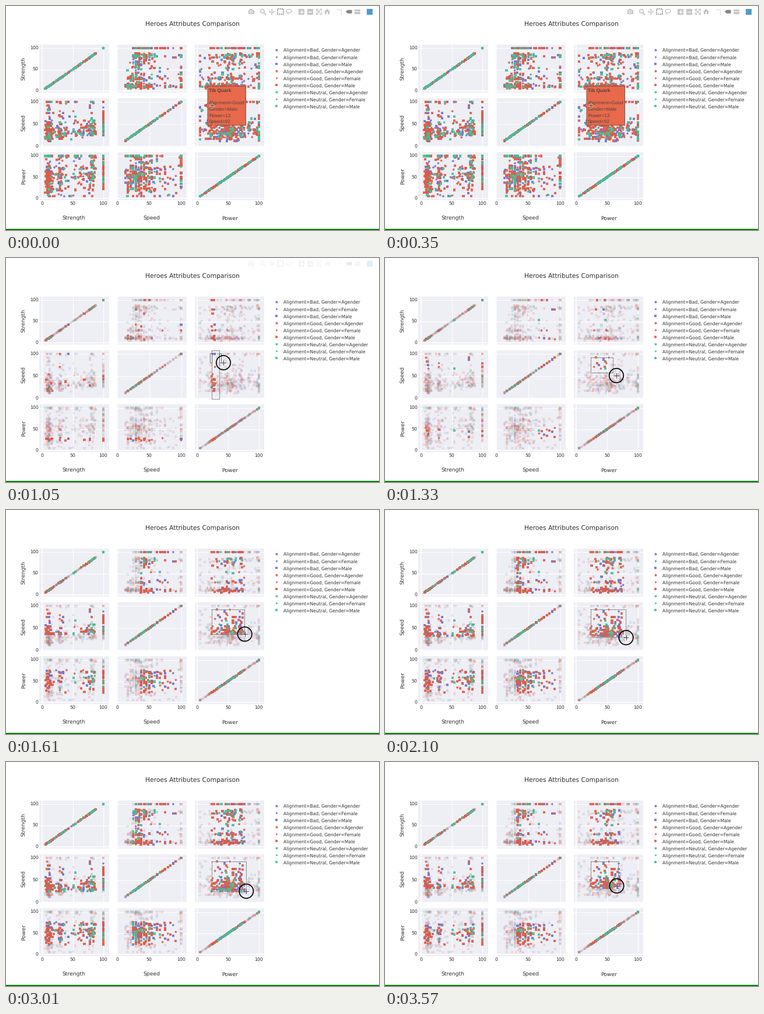
Write a matplotlib script that moves like this. It is 640 px wide and 383 px high and loops after 3640 ms.

```python
from itertools import product

import matplotlib.pyplot as plt
import numpy as np
from matplotlib.animation import FuncAnimation
from matplotlib.colors import to_rgb
from matplotlib.patches import Circle, Ellipse, Polygon, Rectangle

W, H, DPI = 640, 383, 64
PT = 72 / DPI  # points per pixel
FRAMES, INTERVAL = 52, 70
PRESS = 12  # mouse down
INK, PALE, DARK = "#303030", "#c6c6c6", "#858585"

plt.rcParams["font.family"] = "DejaVu Sans"
plt.rcParams["text.hinting"] = "no_hinting"
fig = plt.figure(figsize=(W / DPI, H / DPI), dpi=DPI, facecolor="white")
ax = fig.add_axes([0, 0, 1, 1])
ax.set_xlim(0, W)
ax.set_ylim(H, 0)
ax.axis("off")


def rect(x, y, w, h, color, z=1, edge="none", lw=0, **kw):
    return ax.add_patch(Rectangle((x, y), w, h, facecolor=color, edgecolor=edge,
                                  lw=lw * PT, zorder=z, **kw))


def line(xs, ys, color, lw=1, z=1, **kw):
    return ax.plot(xs, ys, color=color, lw=lw * PT, zorder=z, **kw)[0]


def poly(points, color, z=1, edge="none", lw=0):
    return ax.add_patch(Polygon(points, facecolor=color, edgecolor=edge,
                                lw=lw * PT, zorder=z))


def label(x, y, s, size, ha="center", **kw):
    kw = {"color": INK, **kw}
    return ax.text(x, y + 0.37 * size, s, fontsize=size * PT, ha=ha,
                   va="baseline", **kw)


# ---- panels
NAMES = ["Strength", "Speed", "Power"]
LEFT = 57 + 133.4 * np.arange(3)
TOP = 66 + 92 * np.arange(3)
PANEL_W, PANEL_H = 119.6, 82.4
X_ZERO, X_UNIT = [62, 191, 328], [1.05, 1.095, 1.06]
Y_ZERO, Y_UNIT = [145, 240, 329], [-0.73, -0.76, -0.725]


def to_x(v, col):
    return X_ZERO[col] + X_UNIT[col] * v


def to_y(v, row):
    return Y_ZERO[row] + Y_UNIT[row] * v


def draw_panels():
    for col, row in product(range(3), repeat=2):
        x, y = LEFT[col], TOP[row]
        rect(x, y, PANEL_W, PANEL_H, "#eeeef5")
        for v in (0, 50, 100):
            lw = 1 if v else 1.6
            line([to_x(v, col)] * 2, [y, y + PANEL_H], "white", lw, 2)
            line([x, x + PANEL_W], [to_y(v, row)] * 2, "white", lw, 2)
    for i, name in enumerate(NAMES):
        for v in (0, 50, 100):
            label(to_x(v, i), 338, v, 7.8)
            label(55.5, to_y(v, i), v, 7.8, "right")
        label(LEFT[i] + PANEL_W / 2, 362, name, 9.2)
        ax.text(30, TOP[i] + PANEL_H / 2, name, fontsize=9.2 * PT, rotation=90,
                ha="center", va="center", color=INK)
    label(319.5, 30, "Heroes Attributes Comparison", 10.8)
    rect(0, 381, W, 2, "#078207")


# ---- hero data
rng = np.random.default_rng(7)
HERO = (10, 92, 13)  # the hovered one
SPEED_STEP = 100 / 24


def make_strength(n):
    weak, fair, strong = (rng.normal(m, s, n) for m, s in ((11, 2.5), (29, 2), (82, 3)))
    pick = rng.choice(5, n, p=[0.36, 0.12, 0.25, 0.16, 0.11])
    values = np.choose(pick, [weak, fair, rng.uniform(16, 77, n), strong, 100])
    return np.clip(values, 4, 100).round()


def make_speed(strength):
    n = len(strength)
    raw = 9 + rng.gamma(2.2, 11, n) + 0.13 * strength
    raw = np.where(rng.random(n) < 0.06, 100, np.clip(raw, 8, 100))
    stepped = (raw / SPEED_STEP).round() * SPEED_STEP
    return np.where(rng.random(n) < 0.65, stepped, raw.round())


def make_power(strength):
    n = len(strength)
    power = np.clip(rng.normal(45, 23, n) + 0.16 * strength, 5, 97).round()
    return np.where(rng.random(n) < 0.1, 100, power)


# share of heroes, colour
ALIGNMENTS = {"Bad": (0.27, "#6f70cb"), "Good": (0.57, "#db5c47"),
              "Neutral": (0.16, "#42c09a")}
# share of heroes, marker, size
GENDERS = {"Agender": (0.04, "o", 4.6), "Female": (0.26, "D", 3.2),
           "Male": (0.70, "s", 4.1)}
HEROES = 350


class Trace:
    """One alignment and gender group, drawn in all nine panels."""

    def __init__(self, align, gender):
        share, color = ALIGNMENTS[align]
        part, self.marker, self.size = GENDERS[gender]
        self.name = f"Alignment={align}, Gender={gender}"
        self.color = to_rgb(color)
        strength = make_strength(round(HEROES * share * part))
        data = np.array([strength, make_speed(strength), make_power(strength)])
        if (align, gender) == ("Good", "Male"):
            data[:, 0] = HERO
        xs = [to_x(d, i) for i, d in enumerate(data)]
        ys = [to_y(d, i) for i, d in enumerate(data)]
        self.px, self.py = xs[2], ys[1]
        x, y = zip(*product(xs, ys))
        self.dots = self.scatter(np.concatenate(x), np.concatenate(y), self.size)

    def scatter(self, x, y, size):
        return ax.scatter(x, y, s=(size * PT) ** 2, marker=self.marker,
                          color=self.color, linewidths=0, zorder=3)

    def shade(self, box):
        alpha = np.full(len(self.px), 0.9)
        if box is not None:
            x, y, w, h = box
            inside = ((self.px >= x) & (self.px <= x + w)
                      & (self.py >= y) & (self.py <= y + h))
            alpha = np.where(inside, 0.9, 0.17)
        rgba = np.column_stack([np.tile(self.color, (len(alpha), 1)), alpha])
        self.dots.set_facecolor(np.tile(rgba, (9, 1)))


draw_panels()
traces = [Trace(a, g) for a, g in product(ALIGNMENTS, GENDERS)]
for i, trace in enumerate(traces):
    y = 75 + 12.05 * i
    trace.scatter([464], [y], trace.size * 0.88).set_alpha(0.9)
    label(476.5, y, trace.name, 7.6, "left")


# ---- toolbar, all icons centred on one line
def draw_toolbar(y=9.7):
    corners = list(product((-1, 1), repeat=2))
    # camera
    rect(415.5, y - 3, 10, 7, PALE)
    rect(418, y - 4.5, 5, 2, PALE)
    ax.add_patch(Circle((420.5, y + 0.4), 2.2, fc=PALE, ec="white", lw=1.1, zorder=2))
    # magnifier
    ax.add_patch(Circle((440, y - 0.8), 3.2, fc="none", ec=PALE, lw=1.8))
    line([442.3, 445.5], [y + 1.6, y + 4.8], PALE, 2)
    # pan
    for angle in np.arange(4) * np.pi / 2:
        out = np.array([np.cos(angle), np.sin(angle)])
        side = np.array([-out[1], out[0]]) * 2
        centre = np.array([456, y])
        poly([centre + 5.3 * out, centre + 2.8 * out + side,
              centre + 2.8 * out - side], PALE)
        line(*zip(centre, centre + 4 * out), PALE, 1.2)
    # box select, in use
    rect(466, y - 4.7, 9.5, 9, "none", edge=DARK, lw=1.5, ls=(0, (1.5, 0.8)))
    # lasso
    ax.add_patch(Ellipse((485.5, y - 1), 9.5, 6, fc="none", ec=PALE, lw=1.5))
    line([482, 484.5], [y + 1.5, y + 4.6], PALE, 1.2)
    # zoom in and out
    for x in (507, 521.5):
        rect(x - 5, y - 4.7, 10, 9.5, PALE)
        line([x - 2.5, x + 2.5], [y, y], "white", 1.4, 2)
    line([507, 507], [y - 2.5, y + 2.5], "white", 1.4, 2)
    # autoscale
    for sx, sy in corners:
        cx, cy = 536.5 + 4.7 * sx, y + 4.7 * sy
        line([cx - 3 * sx, cx, cx], [cy, cy, cy - 3 * sy], PALE, 1.3)
        line([536.5, 536.5 + 3 * sx], [y, y + 3 * sy], PALE, 1.3)
    # home
    poly([(545.5, y + 0.4), (551, y - 5), (556.5, y + 0.4)], PALE)
    for x in (547, 552.3):
        rect(x, y, 2.8, 4.7, PALE)
    # spike lines
    line([568, 574.5, 574.5], [y - 3.2, y - 3.2, y + 4.8], PALE, 1.3, ls=(0, (1.5, 1)))
    # hover modes
    poly([(583, y), (586, y - 3), (593.5, y - 3), (593.5, y + 3), (586, y + 3)], DARK)
    for dy in (-4.2, 0.6):
        rect(598, y + dy, 10, 3.5, PALE)
    rect(618.5, y - 5.2, 10.5, 10.5, "#4a9bd0")


draw_toolbar()
veil = rect(408, 1, 226, 18, "white", z=5, alpha=0)


# ---- hover card
def draw_card(x=346, y=137, w=65.5, h=67):
    tip_x, tip_y = to_x(HERO[2], 2), to_y(HERO[1], 1)
    outline = [(tip_x, tip_y), (x, tip_y - 3.5), (x, y), (x + w, y),
               (x + w, y + h), (x, y + h), (x, tip_y + 3.5)]
    parts = [poly(outline, "#e8694b", 6, "#6a4a42", 0.9)]
    lines = ["Tib Quark", "", "Alignment=Good", "Gender=Male",
             f"Power={HERO[2]}", f"Speed={HERO[1]}"]
    for i, s in enumerate(lines):
        parts.append(label(x + 2, y + 7 + 10.7 * i, s, 8.3, "left", zorder=7,
                           color="#4f4441", family="Liberation Sans",
                           weight="normal" if i else "bold"))
    return parts


card = draw_card()

# ---- selection box, handles and pointer
box_back = rect(0, 0, 1, 1, "none", z=8, edge="white", lw=1.1)
box_dots = rect(0, 0, 1, 1, "none", z=9, edge="#202020", lw=1, ls=(0, (1.3, 1.3)))
handles = [rect(0, 163, 3, 15.5, "white", z=10, edge="#444444", lw=0.8)
           for _ in range(2)]
halo = line([], [], "white", 2.6, 11)
cross = line([], [], "#333333", 0.9, 12)
ring = ax.add_patch(Circle((0, 0), 12.2, fc="none", ec="black", lw=1.7 * PT, zorder=12))

# frame, x, y of the pointer's turning points
PATH = np.array([(PRESS, 353.3, 170.3), (15, 373, 179), (21, 409, 212),
                 (23, 409.7, 212.2), (30, 413.6, 218.2), (40, 412.5, 222.2),
                 (46, 412, 219.5), (51, 397.5, 211.8)])
START = PATH[0, 1:]


def pointer(i):
    return [np.interp(i, PATH[:, 0], PATH[:, k]) for k in (1, 2)]


def drag_box(i, full_height):
    x, y = pointer(i)
    if full_height:
        return START[0], 157.5, x - START[0], PANEL_H + 0.6
    return *START, x - START[0], y - START[1]


def update(i):
    dragging = i > PRESS
    full = i < PRESS + 4
    for part in card:
        part.set_visible(i < PRESS)
    veil.set_alpha(float(np.clip((i - 11) / 4.8, 0, 1)))

    # the box trails the pointer, the highlight trails the box
    selection = drag_box(i - 2, full) if i > PRESS + 1 else None
    for trace in traces:
        trace.shade(selection)
    bounds = drag_box(i - 1, full)
    for box in (box_back, box_dots):
        box.set_bounds(*bounds)
        box.set_visible(dragging)
    for handle, x in zip(handles, (START[0] - 3, START[0] + bounds[2] - 0.5)):
        handle.set_x(x)
        handle.set_visible(dragging and full)

    x, y = pointer(i)
    xs = [x - 3.8, x + 3.8, np.nan, x, x]
    ys = [y, y, np.nan, y - 3.8, y + 3.8]
    halo.set_data(xs, ys)
    halo.set_alpha(0.35 if dragging else 0.6)
    cross.set_data(xs, ys)
    ring.set_center((x, y))
    ring.set_visible(i >= PRESS)
    return []


anim = FuncAnimation(fig, update, frames=FRAMES, interval=INTERVAL,
                     repeat=True, repeat_delay=0, blit=False)
plt.show()
```
